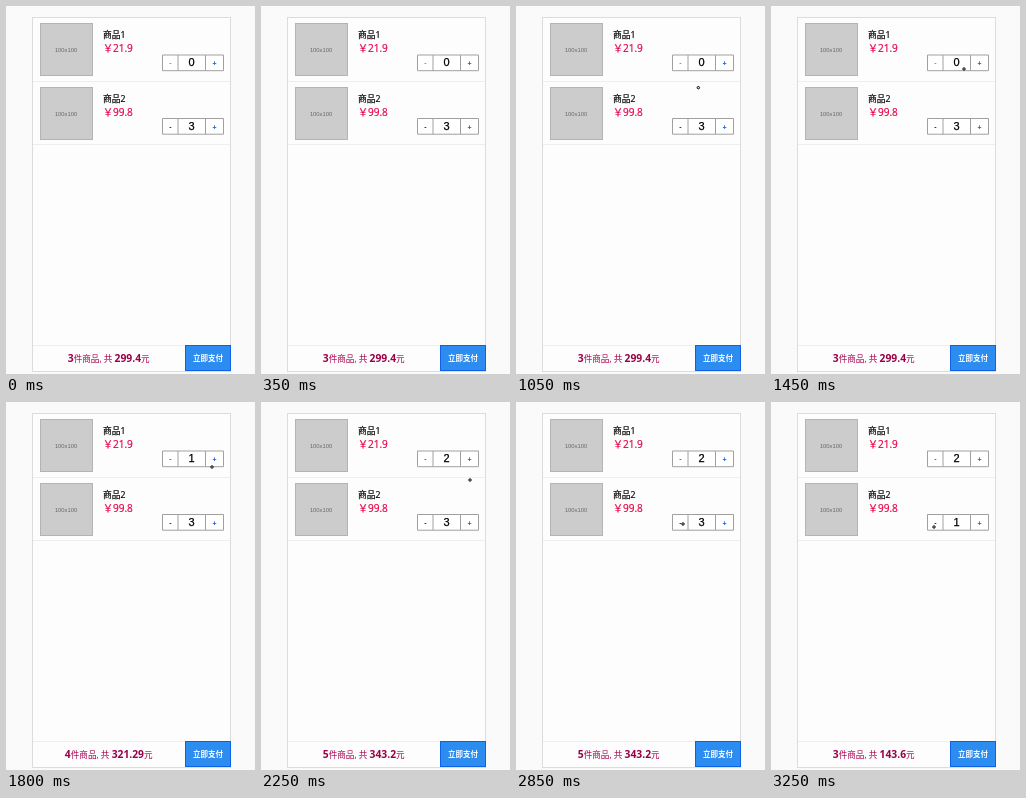
These frames come from a looping animation (249x368 px, 3300 ms). An HTML page:

```html
<!DOCTYPE html>
<html lang="zh">
<head>
<meta charset="utf-8">
<style>
  html, body { margin: 0; width: 100%; height: 100%; overflow: hidden; background: #fafafa; }
  svg { display: block; width: 249px; height: 368px; font-family: "Open Sans", "Noto Sans CJK SC", "Noto Sans CJK", sans-serif; }
  .arial { font-family: "Liberation Sans", sans-serif; text-anchor: middle; }
  .mid { text-anchor: middle; }
  .line { stroke: #eee; }
  .name { font-size: 8.7px; font-weight: 500; fill: #000; stroke: #000; stroke-width: .2px; }
  .price { font-size: 10px; fill: #e60046; stroke: #e60046; stroke-width: .2px; }
  .qty { font-size: 11px; fill: #000; stroke: #000; stroke-width: .25px; }
  .sign { font-size: 7px; font-weight: 700; }
  .total { font-size: 8.6px; font-weight: 500; fill: #a80050; }
  .total tspan { font-size: 10.3px; font-weight: 700; fill: #980048; }
  .pay { font-size: 7.5px; font-weight: 700; fill: #fff; }
  .card { fill: #fdfdfd; stroke: #dcdcdc; filter: drop-shadow(0 0 .5px #ddd); }
</style>
</head>
<body>
<svg viewBox="0 0 249 368">
  <rect class="card" x="26.5" y="11.5" width="198" height="354"/>
  <g id="items"></g>
  <path class="line" d="M27 339.5H179"/>
  <text class="total mid" x="102.7" y="356"><tspan id="count"></tspan>件商品, 共 <tspan id="sum"></tspan>元</text>
  <rect x="179.5" y="339.5" width="45" height="25" fill="#2d8cf0" stroke="#0f62e6"/>
  <text class="pay mid" x="202" y="355">立即支付</text>
  <circle id="pointer" r="1.2" fill="#eee" stroke="#000"/>
</svg>
<script>
const LOOP = 3300, STEP = 50;
const $ = id => document.getElementById(id);

const item = (i, name, price) => `
  <g transform="translate(0 ${i * 64})">
    <rect x="34.5" y="17.5" width="52" height="52" fill="#ccc" stroke="#b4b4b4"/>
    <text class="arial" x="60" y="46" font-size="5.8" fill="#666">100x100</text>
    <text class="name" x="97" y="32">${name}</text>
    <text class="price" x="97" y="46">￥${price}</text>
    <path class="line" d="M27 ${75.5 - i}H224"/>
  </g>
  <g transform="translate(0 ${i * 63.5})">
    <path d="M156.5 49H217.5V64.7H156.5ZM172 49V64.7M199.5 49V64.7" fill="#fff" stroke="#a0a0a0"/>
    <text class="arial sign" id="minus${i}" x="164.5" y="59">-</text>
    <text class="arial qty" id="qty${i}" x="185.5" y="60"></text>
    <text class="arial sign" x="208.5" y="60" fill="#0f62e6">+</text>
  </g>`;

$('items').innerHTML = item(0, '商品1', '21.9') + item(1, '商品2', '99.8');

// From each time on: first quantity, second quantity, total
const states = [
  [0, 0, 3, '299.4'],
  [1700, 1, 3, '321.29'],
  [2000, 2, 3, '343.2'],
  [2950, 2, 2, '243.4'],
  [3150, 2, 1, '143.6']
];

// Pointer stops: time, x, y
const path = [
  [500, 168, 112], [700, 173, 98], [1450, 193, 63], [1650, 206, 64], [1800, 206, 65],
  [2050, 207, 66], [2250, 209, 78], [2750, 168, 121], [2850, 167, 122], [3250, 163, 125]
];

function pointerAt(t) {
  const i = path.findIndex(p => p[0] > t);
  if (i < 0) return path[path.length - 1].slice(1);
  const [t0, x0, y0] = path[i - 1], [t1, x1, y1] = path[i];
  const k = (t - t0) / (t1 - t0);
  return [x0 + (x1 - x0) * k, y0 + (y1 - y0) * k];
}

function draw(t) {
  const [, a, b, sum] = states.filter(s => s[0] <= t).pop();
  $('qty0').textContent = a;
  $('qty1').textContent = b;
  $('minus0').setAttribute('fill', a ? '#0f62e6' : '#888');
  $('minus1').setAttribute('fill', '#222');
  $('count').textContent = a + b;
  $('sum').textContent = sum;

  const shown = t >= path[0][0];
  $('pointer').setAttribute('visibility', shown ? 'visible' : 'hidden');
  if (shown) $('pointer').setAttribute('transform', `translate(${pointerAt(t)})`);
}

const start = performance.now();
function tick() {
  const t = (performance.now() - start) % LOOP;
  draw(Math.floor(t / STEP) * STEP);
  requestAnimationFrame(tick);
}
tick();
</script>
</body>
</html>
```
